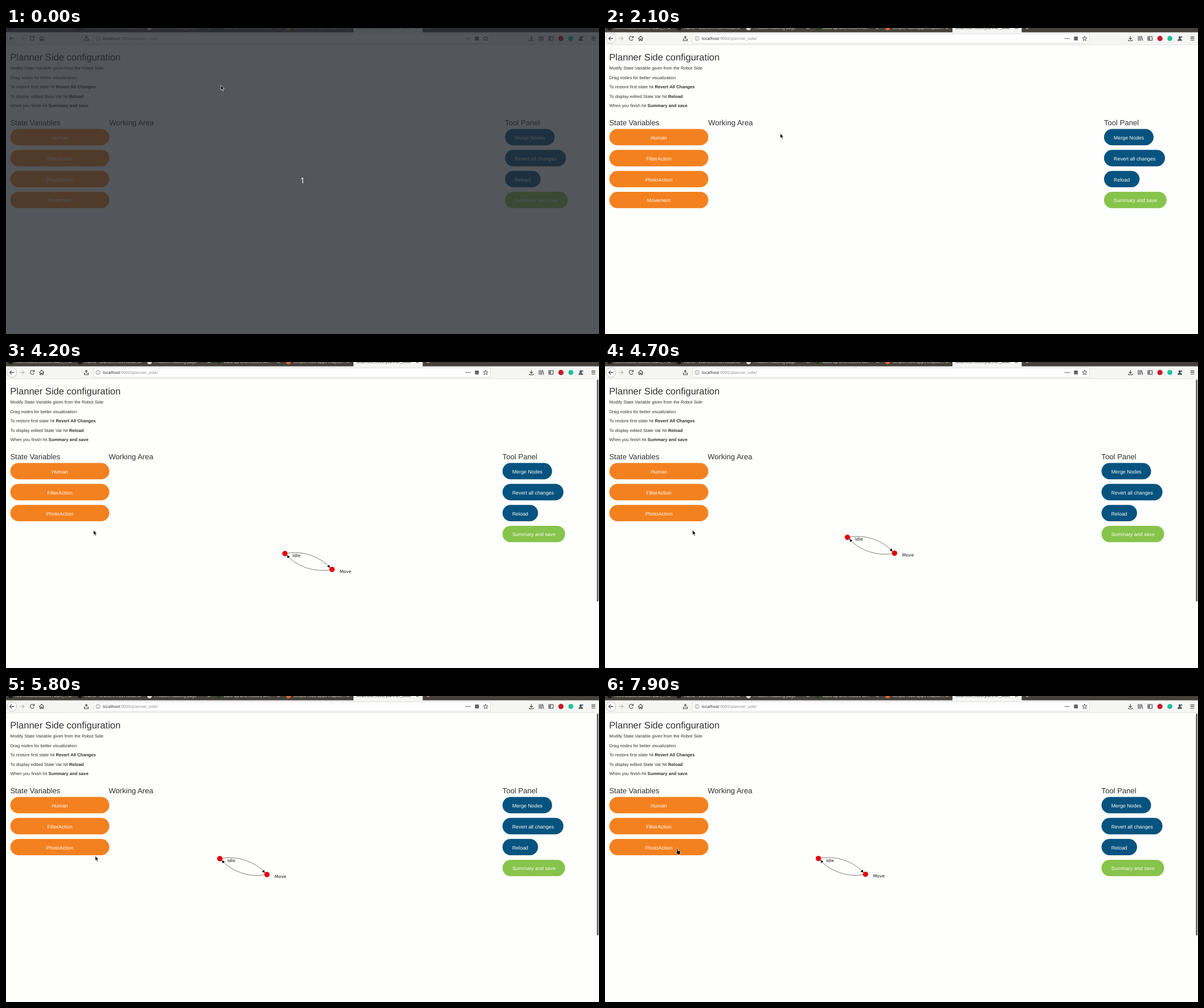
An HTML page for the animation above (8000 ms loop, 1041 px wide and 538 px high).

```html
<!DOCTYPE html>
<html lang="en">
<head>
<meta charset="utf-8">
<title>Planner Side configuration</title>
<style>
html, body { margin: 0; width: 100%; height: 100%; overflow: hidden; background: #fefffc; }
svg { display: block; width: 1041px; height: 538px; text-rendering: geometricPrecision; }
.page { font-family: "Liberation Sans", Arial, sans-serif; fill: #2f3133; }
.page h, .h3 { font-size: 13.1px; }
.p { font-size: 7.7px; }
.p tspan { font-weight: bold; }
.btn text { font-size: 8.85px; fill: #fafaf4; }
.ui { font-family: "Noto Sans", "Open Sans", sans-serif; font-size: 7.17px; }
.line { fill: none; stroke: #45484a; stroke-width: 1.1; }
.node { fill: #e40008; }
.edge { fill: none; stroke: #666; stroke-width: .85; }
.graph text { font: 7.6px "DejaVu Sans", sans-serif; fill: #111; }
</style>
</head>
<body>
<svg viewBox="0 0 1041 538">
  <defs>
    <marker id="tip" viewBox="0 -5 10 10" refX="19" refY="-1.5" markerWidth="6" markerHeight="6" orient="auto">
      <path d="M0-5L10 0L0 5Z" fill="#000"/>
    </marker>
  </defs>
  <rect width="1041" height="538" fill="#fefffc"/>

  <!-- browser -->
  <g class="ui">
    <rect width="1041" height="8" fill="#45423c"/>
    <rect x="610" width="121.5" height="8" fill="#f4f4f2"/>
    <g id="tabs"></g>
    <rect y="7.6" width="1041" height="21.9" fill="#f5f6f4"/>
    <path d="M0 29.5H1041" stroke="#dcdddb" stroke-width=".7"/>
    <rect x="153.5" y="10.3" width="697" height="16.6" rx="1.5" fill="#fff" stroke="#d2d3d1" stroke-width=".7"/>
    <circle cx="10.4" cy="18.4" r="8.5" fill="#fdfdfc" stroke="#b4b5b4" stroke-width=".8"/>
    <path class="line" d="M14.5 18.4H6.5M10 14.9L6.5 18.4L10 21.9"/>
    <path class="line" style="stroke:#babbba" d="M24 18.4H32M28.5 14.9L32 18.4L28.5 21.9"/>
    <path class="line" d="M48.9 16A3.6 3.6 0 1 0 49.3 19.6M49.6 14V17H46.6"/>
    <path class="line" d="M58.3 18.6L62.6 14.4L66.9 18.6M59.8 18V22.3H61.6V19.6H63.6V22.3H65.4V18"/>
    <path class="line" d="M141 20V15M138.8 17L141 14.6L143.2 17M137.5 19.5V22.2H144.5V19.5H142.8M137.5 19.5H139.2"/>
    <g fill="none" stroke="#777" stroke-width=".8">
      <circle cx="161.6" cy="18.4" r="3.6"/><path d="M161.6 17.8V20.5M161.6 16.2V17"/>
    </g>
    <text x="170" y="20.8" fill="#222">localhost<tspan fill="#8a8b8b">:9000/planner_side/</tspan></text>
    <g fill="#555"><circle cx="808" cy="18.4" r="1"/><circle cx="811.2" cy="18.4" r="1"/><circle cx="814.4" cy="18.4" r="1"/></g>
    <rect x="823.3" y="15" width="6.8" height="6.8" fill="#636566"/>
    <path class="line" style="stroke-width:.9" d="M842 14.2L843.2 17.1L846.2 17.3L843.9 19.2L844.7 22.2L842 20.6L839.3 22.2L840.1 19.2L837.8 17.3L840.8 17.1Z"/>
    <path class="line" d="M922.2 14V20M919.7 17.7L922.2 20.2L924.7 17.7M918.8 20.8V22.5H925.6V20.8"/>
    <path class="line" d="M936 14.3V22.4M938.3 14.3V22.4M940.6 14.3V22.4M942 14.5L944 22.3"/>
    <path class="line" d="M953 15H960.5V21.8H953ZM956 15V21.8M953 17.2H956M953 19.4H956"/>
    <circle cx="974.2" cy="18.4" r="4.6" fill="#c9172b"/>
    <circle cx="991.6" cy="18.4" r="4.4" fill="#18c29a"/>
    <g fill="#4d5052">
      <circle cx="1009" cy="16.7" r="2.2"/><path d="M1005 22.4Q1005 18.9 1009 18.9T1013 22.4Z"/><circle cx="1012" cy="15.7" r="1.5" fill="#4f86b6"/>
    </g>
    <path class="line" d="M1027.8 15.6H1034.5M1027.8 18.4H1034.5M1027.8 21.2H1034.5"/>
  </g>

  <!-- page -->
  <g class="page">
    <text x="7.3" y="57.1" font-size="16.55">Planner Side configuration</text>
    <g class="p">
      <text x="7.5" y="73.1">Modify State Variable given from the Robot Side</text>
      <text x="7.5" y="89.5">Drag nodes for better visualization</text>
      <text x="7.5" y="106">To restore first state hit <tspan>Revert All Changes</tspan></text>
      <text x="7.5" y="122.5">To display edited State Var hit <tspan>Reload</tspan></text>
      <text x="7.5" y="139.1">When you finish hit <tspan>Summary and save</tspan></text>
    </g>
    <text class="h3" x="7.4" y="171">State Variables</text>
    <text class="h3" id="work" x="181.2" y="171">Working Area</text>
    <g id="vars" class="btn"></g>
    <g id="tools">
      <text class="h3" x="876" y="171">Tool Panel</text>
      <g id="toolBtns" class="btn"></g>
    </g>
  </g>
  <rect id="scroll" x="1037.3" y="31" width="2.8" height="390" rx="1" fill="#606261"/>

  <!-- origin is the Idle node -->
  <g id="graph" class="graph">
    <path class="edge" marker-end="url(#tip)" d="M0 0A87.2 87.2 0 0 1 82.7 27.9"/>
    <path class="edge" marker-end="url(#tip)" d="M82.7 27.9A87.2 87.2 0 0 1 0 0"/>
    <circle class="node" r="4.7"/>
    <circle class="node" cx="82.7" cy="27.9" r="4.7"/>
    <text x="13.4" y="6">Idle</text>
    <text x="96.2" y="33.8">Move</text>
  </g>

  <g id="shade">
    <rect width="1041" height="538" fill="rgb(35,39,46)" opacity=".78"/>
    <text x="520.4" y="273.2" text-anchor="middle" fill="#fff" font-family="Noto Sans, sans-serif" font-size="14" font-weight="500">1</text>
  </g>

  <g id="cursor" fill="#0a0a0a" stroke="#fff" stroke-width=".7" stroke-linejoin="round">
    <path id="arrow" d="M0 0V8.8L2 7L3.4 10.4L4.9 9.8L3.5 6.5H6.1Z"/>
    <path id="hand" d="M-1 .7Q0-.7 1 .7V4L4.6 4.8Q5.6 5.1 5.4 6.3L4.7 9V11.3H-.2V9.8L-2.6 6.7Q-2.7 5.5-1 6.4Z"/>
  </g>
</svg>
<script>
const $ = id => document.getElementById(id);
const LOOP = 8000, OPEN = 4200;

const button = (x, row, w, fill, label, textX, anchor) => {
  const y = 177.5 + row * 36.85;
  return `<g><rect x="${x}" y="${y}" width="${w}" height="28.8" rx="14.4" fill="${fill}"/>` +
    `<text x="${textX}" y="${y + 18.3}" text-anchor="${anchor}">${label}</text></g>`;
};

$('vars').innerHTML = ['Human', 'FilterAction', 'PhotoAction', 'Movement']
  .map((s, i) => button(7.6, i, 173.8, '#f4811f', s, 94.5, 'middle')).join('');
$('toolBtns').innerHTML = [['Merge Nodes', 87], ['Revert all changes', 107], ['Reload', 62.4], ['Summary and save', 110]]
  .map(([s, w], i) => button(876, i, w, i < 3 ? '#07537f' : '#87c44b', s, 893.1, 'start')).join('');

const tabs = [
  ['ros-module/docker/start_…', '#161616'], ['frame - branch7/ros-modu…', '#161616'],
  ['Problem loading page', '#d8d6d0'], ['Back up and restore wi…', '#25401f'],
  ['Simple robo apps chapter…', '#e8642c'], ['localhost:9000/planner_side/', '']
];
$('tabs').innerHTML = tabs.map(([s, icon], i) => {
  const x = i * 122, ink = icon ? '#d6d2ca' : '#333';
  return (icon ? `<circle cx="${x + 8}" cy="0" r="4" fill="${icon}"/>` : '') +
    `<text x="${icon ? x + 16.5 : 615}" y="2.2" fill="${ink}">${s}</text>` +
    `<path d="M${x + 110} -2.5L${x + 114.5} 2M${x + 114.5} -2.5L${x + 110} 2" stroke="${ink}"/>`;
}).join('') + '<path d="M738.5 0H743.5M741 -2.5V2.5" stroke="#d6d2ca"/>';

// time, x, y of the pointer's hot spot
const pointer = [
  [0, 377, 100.4], [1700, 377, 100.4], [1800, 374, 104], [2000, 345, 145], [2200, 270, 225],
  [2400, 228, 270], [2600, 216.5, 254], [2700, 213.5, 252.5], [3000, 213.5, 252.5],
  [3100, 213, 259], [3200, 211.7, 272], [3300, 211.7, 272], [3400, 211.6, 277.3],
  [3600, 183, 291], [3800, 153.6, 295.4], [5400, 153.6, 295.4], [5600, 156, 289],
  [5900, 157, 277], [6500, 123.9, 275], [6800, 127, 267.7]
];
// time, distance of the graph from its resting place
const drift = [
  [4200, 115], [4400, 103], [4500, 88], [4600, 69], [4700, 51], [4800, 34],
  [4900, 19], [5000, 8.5], [5100, 4.5], [5300, 2.4], [5900, .4], [6500, 0]
];

function at(keys, t) {
  const i = keys.findIndex(k => k[0] > t);
  if (i < 0) return keys[keys.length - 1].slice(1);
  if (i === 0) return keys[0].slice(1);
  const a = keys[i - 1], b = keys[i], f = (t - a[0]) / (b[0] - a[0]);
  return a.slice(1).map((v, j) => v + (b[j + 1] - v) * f);
}

const show = (el, on) => el.setAttribute('visibility', on ? 'visible' : 'hidden');
const move = (el, x, y) => el.setAttribute('transform', `translate(${x} ${y})`);

function draw(now) {
  const t = Math.floor(now % LOOP / 100) * 100;
  const open = t >= OPEN;
  show($('shade'), t < 500);
  show($('graph'), open);
  show($('scroll'), open);
  show($('vars').lastChild, !open);
  move($('work'), open ? -1 : 0, 0);
  move($('tools'), open ? -4.4 : 0, 0);

  const [d] = at(drift, t);
  move($('graph'), 374.6 + d, 285.6 + d * .445);

  const [x, y] = at(pointer, t);
  const over = x < 181.4 && ((y > 251 && y < 280) || (y > 288 && !open));
  move($('cursor'), x, y);
  show($('arrow'), !over);
  show($('hand'), over);
  requestAnimationFrame(() => draw(performance.now() - start));
}
const start = performance.now();
draw(0);
</script>
</body>
</html>
```
